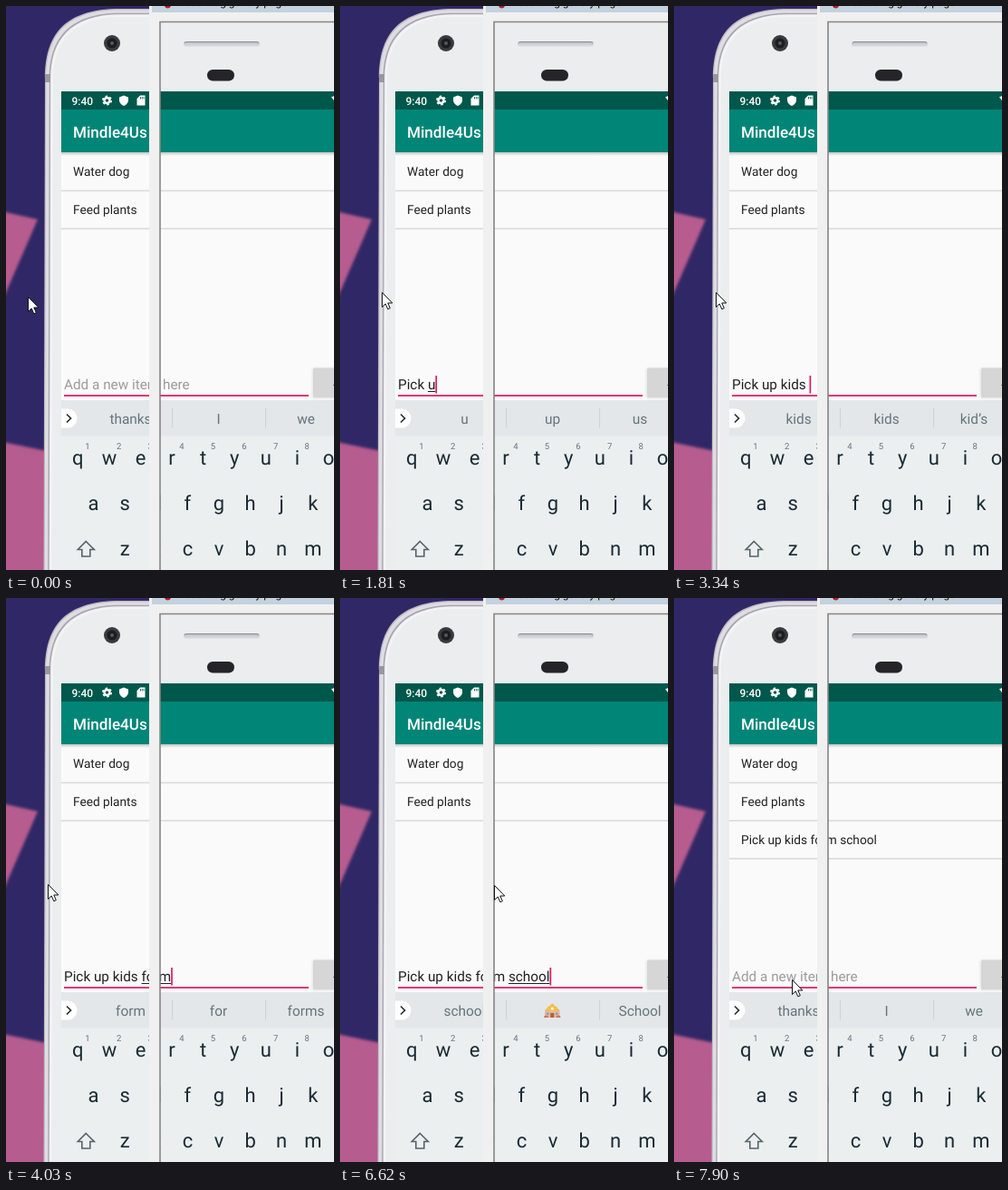
An HTML page that plays this animation: 362 px wide and 621 px high, repeating every 8 s.

```html
<!DOCTYPE html>
<html lang="en">
<head>
<meta charset="utf-8">
<title>To-do list</title>
<style>
  html, body { margin: 0; width: 362px; height: 621px; overflow: hidden; }
  svg { display: block; }
  text { font-family: Roboto, "Open Sans", sans-serif; text-rendering: geometricPrecision; white-space: pre; }
  .mid { text-anchor: middle; }
  .item { font-size: 13.7px; fill: #212121; }
  .field { font-size: 15.3px; }
  .suggest { font-size: 15.4px; fill: #66747b; }
  .key { font-size: 22px; fill: #1a2b33; }
  .digit { font-size: 9.5px; fill: #66737a; }
</style>
</head>
<body>
<svg width="362" height="621" viewBox="0 0 362 621">
  <defs>
    <clipPath id="screen"><rect x="61" y="94" width="301" height="527"/></clipPath>
    <filter id="soft"><feGaussianBlur stdDeviation="1.5"/></filter>
    <linearGradient id="shadow" x2="0" y2="1">
      <stop stop-color="#000" stop-opacity=".22"/><stop offset="1" stop-color="#000" stop-opacity="0"/>
    </linearGradient>
    <linearGradient id="grille" x2="0" y2="1">
      <stop stop-color="#b9babd"/><stop offset="1" stop-color="#e2e3e5"/>
    </linearGradient>
  </defs>

  <!-- desktop -->
  <rect width="362" height="621" fill="#302866"/>
  <g fill="#b65b8e" filter="url(#soft)">
    <path d="M-9 225L35 235L-9 336Z"/>
    <path d="M-9 479L60 493V630H-9Z"/>
  </g>

  <!-- phone -->
  <g id="body"></g>
  <rect x="43" y="75" width="6" height="9" fill="#9a96a0"/>
  <circle cx="117" cy="41" r="9" fill="#3b3a3d"/>
  <circle cx="117" cy="41" r="5.500" fill="#1d1c20"/>
  <circle cx="117" cy="41" r="2" fill="#59565e"/>
  <rect x="196" y="39" width="84" height="6" rx="3" fill="url(#grille)"/>
  <path d="M197 40.500Q198 39.500 200 39.500H276Q278 39.500 279 40.500" fill="none" stroke="#8b8c90"/>
  <rect x="222" y="70" width="30" height="12.500" rx="6.200" fill="#252428"/>

  <g clip-path="url(#screen)">
    <rect x="61" y="94" width="301" height="340" fill="#fafafa"/>
    <rect x="61" y="161" width="301" height="4" fill="url(#shadow)"/>
    <rect x="61" y="94" width="301" height="20" fill="#00574b"/>
    <rect x="61" y="114" width="301" height="47" fill="#008577"/>
    <text x="72.500" y="108.500" font-size="12" font-weight="500" fill="#fff">9:40</text>
    <g fill="#fff">
      <circle cx="111.500" cy="104" r="3" fill="none" stroke="#fff" stroke-width="2.400"/>
      <circle cx="111.500" cy="104" r="4.700" fill="none" stroke="#fff" stroke-width="1.600" stroke-dasharray="2.460"/>
      <path d="M130 98.500L135 100.500V104Q134.500 108 130 110Q125.500 108 125 104V100.500Z"/>
      <path d="M144.500 102L148 98.500H153.500V109.500H144.500Z"/>
      <path d="M359 100.500L362 99V104Z"/>
    </g>
    <path d="M148.500 100V102.500M150.300 100V102.500M152 100V102.500" stroke="#00574b" stroke-width=".8"/>
    <text x="74" y="144.500" font-size="17.100" font-weight="500" fill="#fff">Mindle4Us</text>

    <g id="list"></g>

    <rect x="338" y="399" width="30" height="33" rx="2" fill="#bbb" opacity=".4" filter="url(#soft)"/>
    <rect x="339" y="398.500" width="30" height="32.500" rx="1.500" fill="#d6d6d7"/>
    <rect x="361" y="417" width="2" height="1" fill="#777"/>
    <rect x="64" y="428" width="270" height="2" fill="#de3a74"/>
    <text id="hint" class="field" x="64" y="422" fill="#9b9b9b">Add a new item here</text>
    <text id="input" class="field" x="64" y="422" fill="#212121"></text>
    <rect id="under" y="424" height="1" fill="#212121"/>
    <rect id="caret" y="407" width="1.700" height="19.500" fill="#d81b60"/>

    <!-- keyboard -->
    <rect x="61" y="434" width="301" height="187" fill="#eceff0"/>
    <rect x="61" y="434" width="301" height="39.500" fill="#e3e7e9"/>
    <rect x="51" y="443.500" width="27.500" height="21" rx="10.500" fill="#fff"/>
    <path d="M67 449.500L71.500 454L67 458.500" fill="none" stroke="#263238" stroke-width="1.700"/>
    <path d="M183.500 443V464.500M286.500 443V464.500" stroke="#cdd3d6"/>
    <g id="suggestions"></g>
    <g id="emoji">
      <path d="M226 462V453.500H242.500V462Z" fill="#e9b6a2"/>
      <path d="M226 454.500L230 449.500H231L234.200 446L237.500 449.500H238.500L242.500 454.500Z" fill="#f0bf4c"/>
      <path d="M228 456.500H230.500V459H228ZM238 456.500H240.500V459H238Z" fill="#7fa5b5"/>
      <path d="M232.200 462V457H236.200V462Z" fill="#a8643f"/>
      <circle cx="234.200" cy="452" r="1.600" fill="#fff3d6"/>
      <path d="M225 462Q225 459.500 227.500 459.500T230 462ZM238.500 462Q238.500 459.500 241 459.500T243.500 462Z" fill="#d9705f"/>
    </g>
    <g id="keys"></g>
    <path d="M88.300 589.500L97.300 598.500H92.800V606H83.800V598.500H79.300Z" fill="none" stroke="#55636a" stroke-width="1.600"/>
  </g>

  <!-- window frame lying over the phone -->
  <path d="M158 0H362V17H170V621H158Z" fill="#f0f0f0"/>
  <rect x="161" width="201" height="7" fill="#c4d1de"/>
  <path d="M175 0H182Q181 2.500 178.500 2.500Q176 2.500 175 0Z" fill="#a8232b"/>
  <text x="189" y="0" font-size="12" fill="#111">Recording gallery page</text>
  <path d="M362 17.500H170V621" fill="none" stroke="#858585" stroke-width="1.600"/>

  <path id="mouse" d="M.5.500V16.500L4.200 13L6.800 18.800L9.300 17.700L6.800 12H11.800Z" fill="#fff" stroke="#111" stroke-linejoin="round"/>
</svg>
<script>
const LOOP = 8000, ROW = 41.8, KEY = 34.6, FIELD_X = 64;
const $ = id => document.getElementById(id);

function add(parent, tag, attrs, content = '') {
  const el = document.createElementNS('http://www.w3.org/2000/svg', tag);
  for (const name in attrs) el.setAttribute(name, attrs[name]);
  el.textContent = content;
  return $(parent).appendChild(el);
}

// Nested outlines give the metal rim of the phone.
[[0, '#bcb8c2'], [1.2, '#dfdde2'], [4.8, '#a9a6af'], [6.2, '#f2f3f4'], [9, '#ebedee']].forEach(([d, fill]) =>
  add('body', 'path', {
    fill, d: `M${41.5 + d} 621L${43 + d} 80C${43 + d} ${32 + d} ${64 + d} ${3 + d} 126 ${3 + d}H362V621Z`
  }));

const rows = ['Water dog', 'Feed plants', 'Pick up kids form school'].map((label, i) => [
  add('list', 'text', { class: 'item', x: 74, y: 187.3 + i * ROW }, label),
  add('list', 'rect', { x: 61, y: 202.7 + i * ROW, width: 301, height: 1.5, fill: '#d9d9d9' })
]);

[['qwertyuio', 79.3, 504.5], ['asdfghjk', 96.6, 554.5], ['zxcvbnm', 131.2, 605]].forEach(([letters, x, y], row) =>
  [...letters].forEach((letter, i) => {
    add('keys', 'text', { class: 'key mid', x: x + i * KEY, y }, letter);
    if (!row && i < 8) add('keys', 'text', { class: 'digit mid', x: 90 + i * KEY, y: 488 }, i + 1);
  }));

const slots = [137.5, 234.5, 331].map(x => add('suggestions', 'text', { class: 'suggest mid', x, y: 459.5 }));

// time, typed text
const typing = [
  [-600, ''], [150, ''],
  [1110, 'P'], [1250, 'Pi'], [1390, 'Pic'], [1530, 'Pick'], [1670, 'Pick '], [1810, 'Pick u'],
  [2090, 'Pick up'], [2230, 'Pick up '], [2510, 'Pick up k'], [2640, 'Pick up ki'],
  [2770, 'Pick up kid'], [2910, 'Pick up kids'],
  [3340, 'Pick up kids '], [3620, 'Pick up kids f'], [3750, 'Pick up kids fo'],
  [3890, 'Pick up kids for'], [4030, 'Pick up kids form'], [4300, 'Pick up kids form '],
  [4860, 'Pick up kids form s'], [5000, 'Pick up kids form sc'], [5130, 'Pick up kids form sch'],
  [5270, 'Pick up kids form scho'], [5400, 'Pick up kids form schoo'],
  [5680, 'Pick up kids form school'], [7040, '']
];

// time, the three suggested words ("*" is the school emoji)
const offers = [
  [0, 'thanks I we'], [1110, 'P Please I'], [1250, 'Pi Pick Pizza'], [1390, 'Pic Pick Pics'],
  [1530, 'Pick Pick Picked'], [1670, 'up the a'], [1810, 'u up us'], [2090, 'up up ups'],
  [2230, 'the from a'], [2510, 'k kids keys'], [2640, 'ki kids kind'], [2770, 'kid kids kid’s'],
  [2910, 'kids kids kid’s'], [3480, 'from and at'], [3620, 'f from for'], [3750, 'fo for from'],
  [3890, 'for for form'], [4030, 'form for forms'], [4300, 'the and of'],
  [4860, 's school so'], [5000, 'sc school scale'], [5130, 'sch school schedule'],
  [5270, 'scho school School'], [5530, 'schoo school School'], [5680, 'school * School'],
  [7320, 'thanks I we']
];

// time, pointer tip
const pointer = [
  [0, 24, 320], [150, 46, 315], [5810, 52, 312], [5960, 80, 303], [6090, 106, 297], [6230, 126, 296],
  [6360, 143, 301], [6500, 157, 308], [6620, 170, 316], [6760, 268, 364], [6900, 348, 409],
  [7320, 290, 310], [7460, 190, 190], [7600, 80, 168], [7750, 26, 300], [7900, 130, 420]
];

const latest = (steps, t) => steps.findLast(step => step[0] <= t);

function textWidth(content) {
  $('input').textContent = content;
  return content ? $('input').getComputedTextLength() : 0;
}

function showInput(t) {
  const [since, typed] = latest(typing, t);
  const wordStart = FIELD_X + textWidth(typed.slice(0, typed.lastIndexOf(' ') + 1));
  const end = FIELD_X + textWidth(typed);
  $('under').setAttribute('x', wordStart);
  $('under').setAttribute('width', Math.max(0, end - wordStart));
  $('caret').setAttribute('x', end);
  $('caret').setAttribute('opacity', (t - since) % 935 < 540 ? 1 : 0);
  $('hint').setAttribute('opacity', typed ? 0 : 1);
}

function render(t) {
  showInput(t);
  const words = latest(offers, t)[1].split(' ');
  slots.forEach((slot, i) => slot.textContent = words[i] === '*' ? '' : words[i]);
  $('emoji').setAttribute('opacity', words[1] === '*' ? 1 : 0);
  rows[2].forEach(el => el.setAttribute('opacity', t >= 7040 ? 1 : 0));
  const [, x, y] = latest(pointer, t);
  $('mouse').setAttribute('transform', `translate(${x} ${y})`);
}

const start = performance.now();
function tick() {
  render((performance.now() - start) % LOOP);
  requestAnimationFrame(tick);
}
tick();
</script>
</body>
</html>
```
